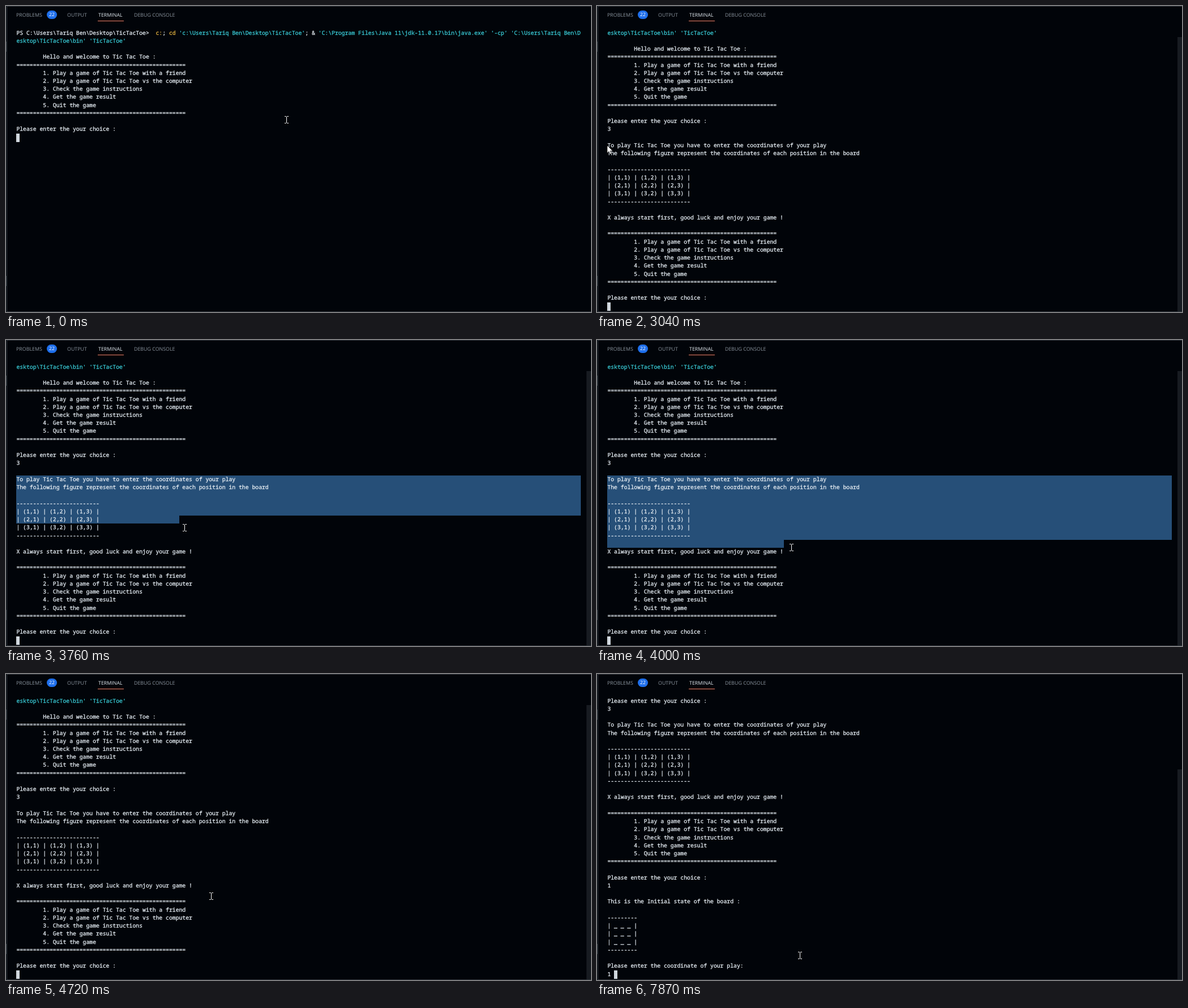
These frames come from a looping animation (1033 by 542 pixels, 8000 ms). An HTML page:

```html
<!DOCTYPE html>
<html lang="en">
<head>
<meta charset="utf-8">
<title>Tic Tac Toe in a terminal</title>
<style>
  html, body { margin: 0; width: 100%; height: 100%; overflow: hidden; background: #010409; }
  body { position: relative; text-rendering: geometricPrecision; }
  body > * { position: absolute; }
  .frame { inset: 0 0 0 1px; border: solid #30363d; border-width: 1px 0 1px 1px; }
  .edge { left: 0; width: 1px; height: 18px; background: #30363d; }
  .tab { top: 9px; font: 8.85px/14px "Open Sans", "Noto Sans", sans-serif; color: #8b949e; white-space: pre; }
  .active { color: #e6edf3; }
  .line { left: 162px; top: 26px; width: 46px; height: 1px; background: #f78166; }
  .badge { left: 72px; top: 8px; width: 18px; height: 15px; border-radius: 8px; background: #1f6feb;
    color: #fff; font: 8.6px/15px "Open Sans", "Noto Sans", sans-serif; text-align: center; }
  #text { left: 18.4px; top: 40.6px; margin: 0; color: #e6edf3; -webkit-text-stroke: .3px currentColor;
    font: 9.787px/14.24px "Noto Sans Mono", "DejaVu Sans Mono", monospace; }
  .cmd { color: #e3b341; }
  .str { color: #3acbd6; }
  .sel { left: 18px; background: #264f78; }
  #caret { width: 6px; height: 15px; background: #d0d7de; }
  #thumb { right: 0; bottom: 1px; width: 8px; background: #171b21; }
  svg { left: 0; top: 0; overflow: visible; }
</style>
</head>
<body>
<div class="frame"></div>
<div class="edge" style="top:63px"></div>
<div class="edge" style="top:478px"></div>
<div class="tab" style="left:18px">PROBLEMS</div>
<div class="badge">22</div>
<div class="tab" style="left:108px">OUTPUT</div>
<div class="tab active" style="left:163px">TERMINAL</div>
<div class="tab" style="left:226px">DEBUG CONSOLE</div>
<div class="line"></div>
<div class="sel" id="selBlock"></div>
<div class="sel" id="selTail"></div>
<div id="caret"></div>
<pre id="text"></pre>
<div id="thumb"></div>
<svg id="beam" width="7" height="13"><path d="M0 .5H2.5L3.5 1.5L4.5 .5H7M3.5 1V12M0 12.5H2.5L3.5 11.5L4.5 12.5H7" fill="none" stroke="#fff"/></svg>
<svg id="arrow" width="11" height="17"><path d="M0 0V13.5L3.2 10.6L5.5 15.6L7.8 14.6L5.6 9.8H10Z" fill="#fff" stroke="#000" stroke-width=".7"/></svg>
<script>
const LOOP = 8000, ROW = 14.24, COL = 5.872, LEFT = 18.4, TOP = 40.6;
const ROWS = 35, BOTTOM = 542;
const $ = id => document.getElementById(id);
const span = (cls, s) => `<span class="${cls}">${s}</span>`;

const home = "\\Users\\Tariq Ben\\";
const rule = "=".repeat(51);
const menu = [
  rule,
  ...["Play a game of Tic Tac Toe with a friend", "Play a game of Tic Tac Toe vs the computer",
    "Check the game instructions", "Get the game result", "Quit the game"]
    .map((s, i) => `        ${i + 1}. ${s}`),
  rule, "", "Please enter the your choice :"
];
const cells = [1, 2, 3].map(r => "| " + [1, 2, 3].map(c => `(${r},${c})`).join(" | ") + " |");

const welcome = [
  `PS C:${home}Desktop\\TicTacToe&gt;  ${span("cmd", "c:")}; ${span("cmd", "cd")} ` +
    span("str", `'c:${home}Desktop\\TicTacToe'`) + "; &amp; " +
    span("str", `'C:\\Program Files\\Java 11\\jdk-11.0.17\\bin\\java.exe' '-cp' 'C:${home}D`),
  span("str", "esktop\\TicTacToe\\bin' 'TicTacToe'"),
  "", "        Hello and welcome to Tic Tac Toe :", ...menu
];
const help = [
  ...welcome, "3", "",
  "To play Tic Tac Toe you have to enter the coordinates of your play",
  "The following figure represent the coordinates of each position in the board",
  "", "-".repeat(25), ...cells, "-".repeat(25), "",
  "X always start first, good luck and enjoy your game !", "", ...menu
];
const game = [
  ...help, "1", "", "This is the Initial state of the board :", "",
  "-".repeat(9), ...Array(3).fill("| _ _ _ |"), "-".repeat(9), "",
  "Please enter the coordinate of your play:"
];

const pages = [
  { start: 0, lines: welcome, input: "3 ", keys: [680, 1080] },
  { start: 1630, lines: help, input: "1", keys: [6440] },
  { start: 6720, lines: game, input: "1 ", keys: [7720, 7870] }
];

// The pointer is seen at fixed ticks while it eases from one stop to the next.
const TICK = 120, PHASE = 40;
const stops = [
  { from: 0, to: 0, x: 495, y: 201 },
  { from: 2300, to: 3040, x: 18, y: 247 },
  { from: 3040, to: 3520, x: 62, y: 250 },
  { from: 3520, to: 3760, x: 315, y: 332 },
  { from: 3760, to: 4000, x: 343, y: 367 },
  { from: 4000, to: 4360, x: 355, y: 377 },
  { from: 4480, to: 4840, x: 364, y: 399 },
  { from: 4960, to: 5080, x: 324, y: 463 },
  { from: 5080, to: 5440, x: 290, y: 532 },
  { from: 5680, to: 5800, x: 358, y: 498 }
];
const FIRST = 14, DRAG_START = 3280, DRAG_END = 4570;

const rowY = row => Math.round(TOP + row * ROW);
const colX = col => Math.round(LEFT + col * COL);
const ease = p => p * p * (3 - 2 * p);

function pointerAt(time) {
  const t = Math.floor((time - PHASE) / TICK) * TICK + PHASE;
  let { x, y } = stops[0];
  for (const stop of stops.slice(1)) {
    const p = (t - stop.from) / (stop.to - stop.from);
    const k = ease(Math.min(1, Math.max(0, p)));
    x += (stop.x - x) * k;
    y += (stop.y - y) * k;
  }
  return { x: Math.round(x), y: Math.round(y), isArrow: t === 3040 };
}

let shown;
function showPage(t) {
  const page = pages.findLast(p => p.start <= t);
  const input = page.input.slice(0, page.keys.filter(key => key <= t).length);
  const total = page.lines.length + 1;
  const scroll = Math.max(0, total - ROWS);
  const text = [...page.lines.slice(scroll), input].join("\n");
  if (text === shown) return;
  shown = text;
  $("text").innerHTML = text;
  $("caret").style.left = colX(input.length) + "px";
  $("caret").style.top = rowY(total - 1 - scroll) + "px";
  $("thumb").style.display = scroll ? "" : "none";
  $("thumb").style.top = Math.round(TOP + (BOTTOM - TOP) * scroll / total) + "px";
}

function box(el, top, bottom, right) {
  el.style.top = top + "px";
  el.style.height = bottom - top + "px";
  el.style.width = right - 18 + "px";
}

// The selection ends a little up and left of the pointer.
function showSelection(t, { x, y }) {
  const dragging = t >= DRAG_START && t < DRAG_END;
  const row = dragging ? Math.max(FIRST, Math.floor((y - 8 - TOP) / ROW)) : FIRST;
  const col = dragging ? Math.max(0, Math.round((x - 11 - LEFT) / COL)) : 0;
  box($("selBlock"), rowY(FIRST), rowY(row), 1015);
  box($("selTail"), rowY(row), rowY(row + 1), colX(col));
}

function showPointer({ x, y, isArrow }) {
  $("beam").style.display = isArrow ? "none" : "";
  $("arrow").style.display = isArrow ? "" : "none";
  $("beam").style.transform = `translate(${x - 3}px, ${y - 6}px)`;
  $("arrow").style.transform = `translate(${x}px, ${y}px)`;
}

const start = performance.now();
function draw(now) {
  const t = Math.max(0, now - start) % LOOP;
  const pointer = pointerAt(t);
  showPage(t);
  showSelection(t, pointer);
  showPointer(pointer);
  requestAnimationFrame(draw);
}
draw(start);
</script>
</body>
</html>
```
